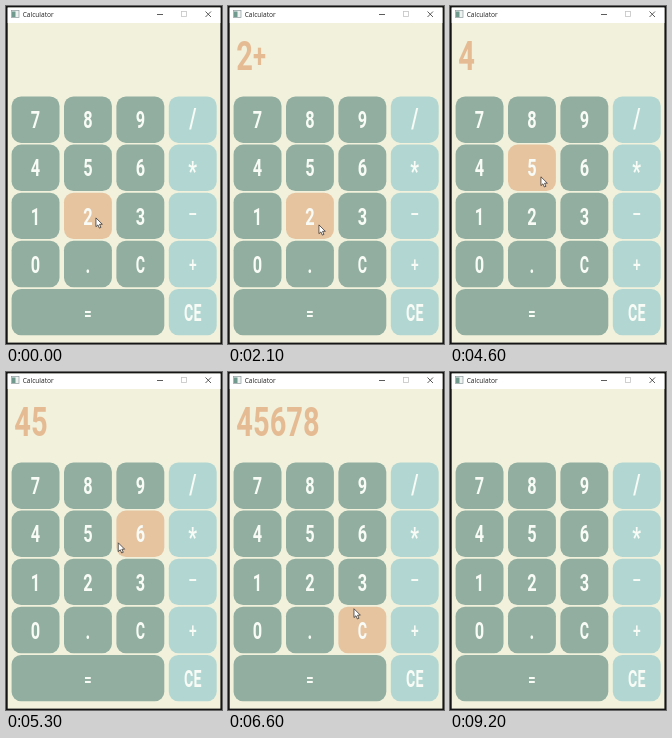
Write an HTML page that moves like this. It is 216x338 px and loops after 9700 ms.

```html
<!DOCTYPE html>
<html lang="en">
<head>
<meta charset="utf-8">
<title>Calculator</title>
<style>
html, body { margin: 0; width: 100%; height: 100%; overflow: hidden; background: #151515; }
svg { display: block; width: 216px; height: 338px; }
text { font-family: Roboto, "Liberation Sans", sans-serif; font-weight: 700; }
.label { font-size: 23.7px; fill: #f8fbf6; text-anchor: middle; }
.sign { font-size: 20px; font-weight: 500; }
.tall { font-size: 28px; }
.display { font-size: 41.5px; fill: #e5bb94; }
.plus { font-size: 34px; baseline-shift: 2px; }
.title { font: 500 6.6px "Open Sans", "Noto Sans", sans-serif; fill: #222; }
</style>
</head>
<body>
<svg viewBox="0 0 216 338" xmlns="http://www.w3.org/2000/svg">
  <rect width="216" height="338" fill="#151515"/>
  <rect x="1.7" y="1.6" width="212.7" height="335" fill="#f1f1dc"/>
  <rect x="1.7" y="1.6" width="212.7" height="15.4" fill="#fff"/>
  <rect x="5.5" y="4.5" width="7.5" height="7" fill="#eef2f1" stroke="#8d9a9c" stroke-width=".7"/>
  <rect x="6" y="5.5" width="3.5" height="5.5" fill="#6f9a8d"/>
  <text class="title" x="16.7" y="10.6">Calculator</text>
  <g fill="none" stroke="#333" stroke-width=".8">
    <path d="M151 8.5h6M199.5 5.5l5.5 5.5M205 5.5l-5.5 5.5"/>
    <rect x="175.5" y="5.5" width="5" height="5" stroke="#c4c4c4"/>
  </g>
  <g id="keys"></g>
  <text id="display" class="display" transform="translate(8.3 63.7) scale(.7 1)"></text>
  <path id="cursor" d="M0 0V8.8L2 7 3.4 10.2 5 9.5 3.6 6.4H6.4Z" fill="#fff" stroke="#222" stroke-width=".7" stroke-linejoin="round"/>
</svg>
<script>
const LOOP = 9700, STEP = 100, EXIT = 9200;
const GREEN = '#91aea1', TEAL = '#b2d7d2', HOVER = '#e7c4a0', PRESSED = '#e4b992';
const byId = id => document.getElementById(id);
const display = byId('display'), cursor = byId('cursor');

function add(parent, tag, attrs, content = '') {
  const el = document.createElementNS('http://www.w3.org/2000/svg', tag);
  for (const name in attrs) el.setAttribute(name, attrs[name]);
  el.textContent = content;
  return parent.appendChild(el);
}

// Vertical shift that centres each symbol on its key
const lift = { '*': 5, '–': -3.5, '+': -1.5 };

function makeKey(label, col, row, span = 1) {
  const x = 5.6 + col * 52.4, y = 90.5 + row * 48.1;
  const w = 47.9 + (span - 1) * 52.4, h = 46.4;
  const base = col === 3 ? TEAL : GREEN;
  const rect = add(byId('keys'), 'rect', { x, y, width: w, height: h, rx: 9.5, fill: base });
  const size = '+–='.includes(label) ? 'sign' : '/*'.includes(label) ? 'tall' : '';
  const condense = label[0] === 'C' ? 0.6 : 0.69;
  const baseline = y + 31.8 + (lift[label] || 0);
  add(byId('keys'), 'text', {
    class: 'label ' + size,
    transform: `translate(${x + w / 2} ${baseline}) scale(${condense} 1)`
  }, label);
  return { label, x, y, w, h, base, rect };
}

const keys = [];
['789/', '456*', '123–', '0.C+'].forEach((line, row) =>
  [...line].forEach((label, col) => keys.push(makeKey(label, col, row))));
keys.push(makeKey('=', 0, 4, 3), makeKey('CE', 3, 4));

// Each click: key, time, travel time, pointer offset from the key's middle
const clicks = [
  ['2', 300, 0, 8, 2], ['+', 1700, 1000], ['2', 2600, 400],
  ['=', 3700, 500, 33, -3], ['5', 5000, 500], ['6', 5500, 400, -15, 9],
  ['7', 6200, 700], ['8', 6400, 200], ['C', 6900, 225, -4, -7],
  ['C', 7200, 0, -4, -7], ['CE', 8900, 400, -7, -4]
].map(([label, at, travel, dx = 9, dy = 9]) => {
  const k = keys.find(key => key.label === label);
  return { label, at, travel, x: k.x + k.w / 2 + dx, y: k.y + k.h / 2 + dy };
});

function press(text, label) {
  if (label === 'CE') return '';
  if (label === 'C') return text.slice(0, -1);
  if (label === '=') return String(text.split('+').reduce((sum, n) => sum + +n, 0));
  return text + label;
}

function pointerAt(t) {
  const i = clicks.findIndex(c => c.at > t);
  if (i === 0) return clicks[0];
  if (i < 0) return clicks[clicks.length - 1];
  const from = clicks[i - 1], to = clicks[i];
  const wait = to.at - from.at > 1200 ? 400 : 0;
  const k = to.travel ? Math.min(1, Math.max(0, (t - from.at - wait) / to.travel)) : 1;
  return { x: from.x + (to.x - from.x) * k, y: from.y + (to.y - from.y) * k };
}

function render(time) {
  const t = Math.floor((time % LOOP) / STEP) * STEP;
  const p = pointerAt(t), visible = t < EXIT;
  const held = clicks.some(c => c.label === '=' && t < c.at && t >= c.at - STEP);
  for (const k of keys) {
    const over = visible && p.x >= k.x && p.x <= k.x + k.w && p.y >= k.y && p.y <= k.y + k.h;
    k.rect.setAttribute('fill', over ? (held ? PRESSED : HOVER) : k.base);
  }
  const text = clicks.filter(c => c.at <= t).reduce((s, c) => press(s, c.label), '');
  display.replaceChildren();
  for (const ch of text) add(display, 'tspan', ch === '+' ? { class: 'plus' } : {}, ch);
  cursor.style.display = visible ? '' : 'none';
  cursor.setAttribute('transform', `translate(${p.x} ${p.y})`);
}

const start = performance.now();
function tick() {
  render(performance.now() - start);
  requestAnimationFrame(tick);
}
tick();
</script>
</body>
</html>
```
